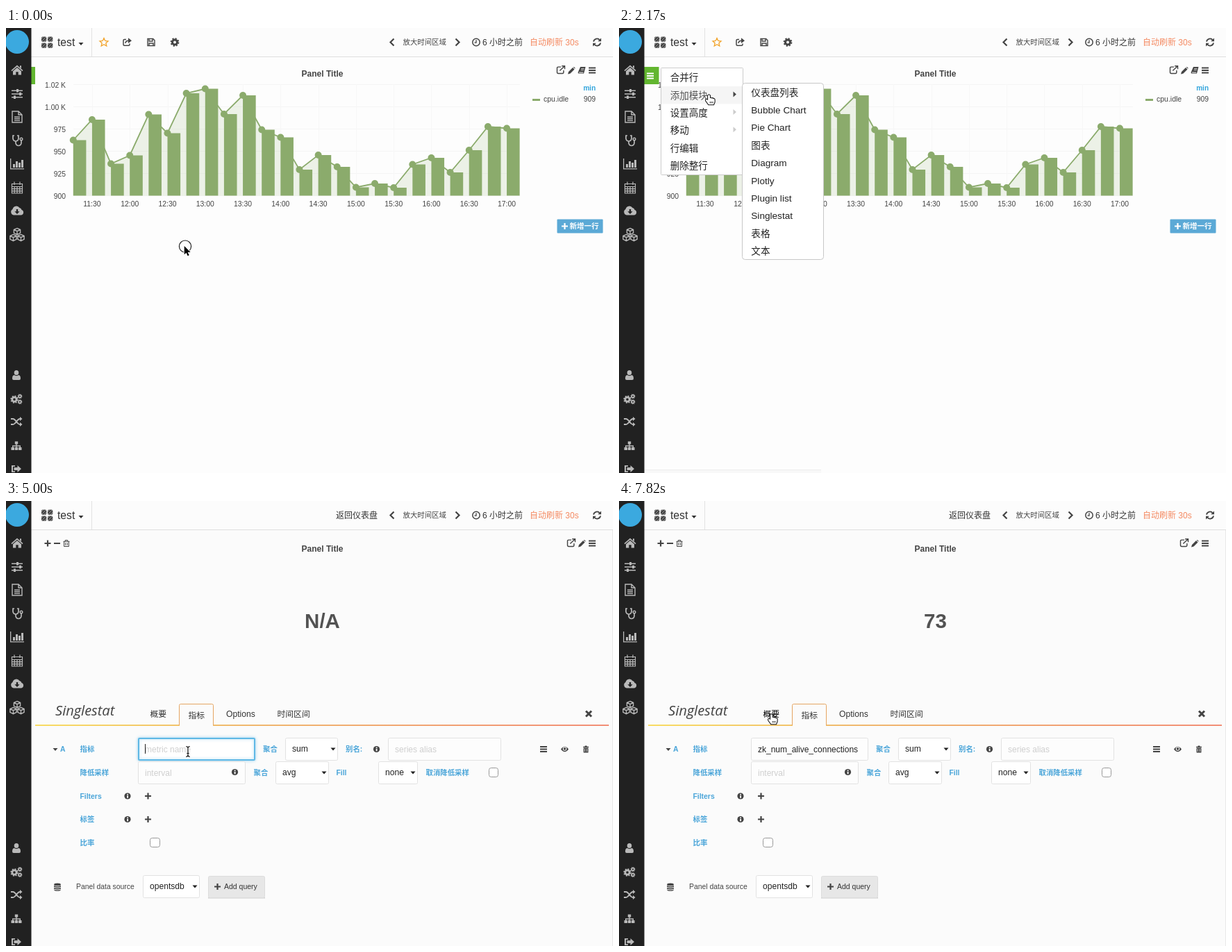
These frames come from a looping animation (874 px wide and 641 px high, 7990 ms). An HTML page with a canvas:

```html
<!DOCTYPE html>
<html lang="zh-CN">
<head>
<meta charset="utf-8">
<title>Dashboard</title>
<style>
html, body { margin: 0; width: 100%; height: 100%; overflow: hidden; background: #fdfdfd; }
canvas { display: block; }
</style>
</head>
<body>
<canvas id="stage" width="874" height="641"></canvas>
<script>
const g = document.getElementById('stage').getContext('2d');
const LOOP = 7990;
const SANS = '"Liberation Sans", "Noto Sans CJK SC", "Noto Sans CJK", sans-serif';
const DARK = '#444', BLUE = '#4aa5d9', GREEN = '#8bab6c', ORANGE = '#ee8243', SIDE = '#b9b9b9';

// y is the middle of the capitals; baselines sit on whole pixels
function text(s, x, y, size, color = DARK, weight = '', align = 'left', font = SANS) {
  g.font = `${weight} ${size}px ${font}`;
  g.textAlign = align;
  g.fillStyle = color;
  g.fillText(s, x, Math.round(y + size * 0.36));
}

function rect(x, y, w, h, color) {
  g.fillStyle = color;
  g.fillRect(x, y, w, h);
}

function box(x, y, w, h, fill, line, r = 2, width = 1) {
  const inset = width / 2;
  g.beginPath();
  g.roundRect(x + inset, y + inset, w - width, h - width, r);
  g.fillStyle = fill;
  g.fill();
  if (line) {
    g.strokeStyle = line;
    g.lineWidth = width;
    g.stroke();
  }
}

function disc(x, y, r, color) {
  g.beginPath();
  g.arc(x, y, r, 0, 7);
  g.fillStyle = color;
  g.fill();
}

function ring(x, y, r, color, width) {
  g.beginPath();
  g.arc(x, y, r, 0, 7);
  g.strokeStyle = color;
  g.lineWidth = width;
  g.stroke();
}

function shape(d, x, y, { fill, line, width = 1.4, scale = 1 }) {
  const p = new Path2D(d);
  g.save();
  g.translate(x, y);
  g.scale(scale, scale);
  if (line) {
    g.strokeStyle = line;
    g.lineWidth = width;
    g.stroke(p);
  }
  if (fill) {
    g.fillStyle = fill;
    g.fill(p, 'evenodd');
  }
  g.restore();
}

const solid = (d, x, y, color = DARK, scale = 1) => shape(d, x, y, { fill: color, scale });
const wire = (d, x, y, color = DARK, width = 1.4, scale = 1) => shape(d, x, y, { line: color, width, scale });

function gear(x, y, r, color) {
  ring(x, y, r * 0.58, color, r * 0.5);
  g.setLineDash([r * 0.353, r * 0.353]);
  ring(x, y, r * 0.9, color, r * 0.32);
  g.setLineDash([]);
}

const plus = (x, y, color = DARK) => solid('M-4.5-1.1H-1.1V-4.5H1.1V-1.1H4.5V1.1H1.1V4.5H-1.1V1.1H-4.5Z', x, y, color);
const caret = (x, y, color = '#222') => solid('M-3.5-2H3.5L0 2Z', x, y, color);
const bars = (x, y, color = DARK) => solid('M-5-4.5H5V-2.5H-5ZM-5-1H5V1H-5ZM-5 2.5H5V4.5H-5Z', x, y, color);
const pencil = (x, y) => solid('M-5 5L-4 1.5L2-4.5L4.5-2L-1.5 4ZM2.7-5.2Q3.5-6 4.5-5L5-4.5Q6-3.5 5.2-2.7Z', x, y);
const external = (x, y) => wire('M0-4H-3.5Q-5-4-5-2.5V3Q-5 4.5-3.5 4.5H2Q3.5 4.5 3.5 3V0.5M-1.5 1L4.7-5M1-5.2H5V-1.2', x, y, DARK, 1.3, 1.1);
const trash = (x, y) => wire('M-5-3H5M-2-3V-5H2V-3M-3.8-3V5H3.8V-3M-1.4-1V3.2M1.4-1V3.2', x, y, DARK, 1.1, 0.9);
const chevron = (x, y, dir) => wire(`M${2.5 * dir}-5L${-2.5 * dir} 0L${2.5 * dir} 5`, x, y, DARK, 2.2);

function info(x, y) {
  disc(x, y, 4.6, DARK);
  rect(x - 0.8, y - 3, 1.8, 1.5, '#fff');
  rect(x - 0.8, y - 0.7, 1.8, 3.5, '#fff');
}

function sidebar() {
  rect(0, 0, 36.5, 641, '#212121');
  disc(16, 20, 17, '#3ba9df');
  solid('M-8.5 0L0-7.5L8.5 0L7.5 1.2L0-5.3L-7.5 1.2ZM-6 1.2L0-4L6 1.2V6.5H1.7V2.2H-1.7V6.5H-6ZM4-6.8H6V-2.8L4-4.6Z', 16, 61, SIDE);
  solid('M-8-5.6H-1V-7H2V-5.6H8V-4H2V-2.4H-1V-4H-8ZM-8-.8H3V-2.2H6V-.8H8V.8H6V2.2H3V.8H-8ZM-8 4H-5V2.5H-2V4H8V5.6H-2V7H-5V5.6H-8Z', 16, 95, SIDE);
  wire('M-7-8H2L7-3V8H-7ZM2-8V-3H7M-4 .2H4M-4 2.8H4M-4 5.4H4', 16, 128, SIDE);
  wire('M-4-7H-6V-3A4 4 0 0 0 2-3V-7H0M-2 1V3.5A4 4 0 0 0 6 3.5V0', 16, 162, SIDE, 1.7);
  ring(22, 160, 1.8, SIDE, 1.4);
  solid('M-10-8H-8.7V6.2H10V7.6H-10ZM-6 0H-3V5H-6ZM-2-4H1V5H-2ZM2-2H5V5H2ZM6-6H9V5H6Z', 16, 196, SIDE);
  wire('M-7.5-5.5H7.5V8H-7.5ZM-7.5-1.5H7.5M-7.5 1.7H7.5M-7.5 4.9H7.5M-3.8-1.5V8M0-1.5V8M3.8-1.5V8M-4-8.5V-4M4-8.5V-4', 16, 230, SIDE, 1.2);
  solid('M-5 6.5A4.6 4.6 0 0 1-6.5-2A5.5 5.5 0 0 1 3.5-4A4 4 0 0 1 6.5-1A3.9 3.9 0 0 1 6 6.5ZM-1.2-2V1.2H-3.6L0 5L3.6 1.2H1.2V-2Z', 16, 263, SIDE);
  for (const [x, y] of [[16, 293], [10.5, 302], [21.5, 302]])
    wire('M0-4.6L4.6-2.5V2.3L0 4.6L-4.6 2.3V-2.5ZM-4.6-2.5L0-.3L4.6-2.5M0-.3V4.6', x, y, SIDE, 1.4);
  solid('M-3.3-3.5A3.3 3.6 0 1 0 3.3-3.5A3.3 3.6 0 1 0-3.3-3.5ZM-6 5Q-6 0-3 0Q0 2 3 0Q6 0 6 5Q6 7 4 7H-4Q-6 7-6 5Z', 15, 500, SIDE);
  gear(12, 535, 5.4, SIDE);
  gear(20, 530.5, 3.2, SIDE);
  gear(20, 538.5, 3.2, SIDE);
  wire('M-8-4H-5Q-3-4 0 0T5 4H6M-8 4H-5Q-3 4 0 0T5-4H6', 15, 567, SIDE, 1.9);
  solid('M5-7L8.5-4L5-1ZM5 1L8.5 4L5 7Z', 15, 567, SIDE);
  solid('M-2.2-6.5H2.2V-2.5H.7V-.7H6V2H7.5V6H3V2H4.6V.7H.7V2H2.2V6H-2.2V2H-.7V.7H-4.6V2H-3V6H-7.5V2H-6V-.7H-.7V-2.5H-2.2Z', 15, 602, SIDE);
  solid('M-7-5H-2V-3.2H-5V3.2H-2V5H-7ZM-3.5-2H1.5V-5L7 0L1.5 5V2H-3.5Z', 15, 635, SIDE);
}

function header(editing) {
  rect(36, 0, 838, 41, '#fcfcfc');
  rect(36, 41, 838, 1, '#dedede');
  rect(123, 0, 1, 41, '#e2e2e2');
  for (let i = 0; i < 4; i++) {
    const x = 50.5 + (i % 2) * 9, y = 12 + (i >> 1) * 9;
    box(x, y, 8.3, 8.3, '#3c3c3c', null, 2);
    wire('M0 4L4 0M.5 7.5L7.5.5M4 8L8 4', x, y, '#ccc', 0.8);
  }
  text('test', 74, 20.7, 15.7, '#333');
  caret(108, 23, '#333');
  if (editing) {
    text('返回仪表盘', 475, 20.7, 12, '#333');
  } else {
    wire('M0-6L1.8-2L6-1.6L2.8 1.2L3.8 5.5L0 3.2L-3.8 5.5L-2.8 1.2L-6-1.6L-1.8-2Z', 141, 20.5, '#f2a42c', 1.3);
    wire('M-1-4H-3.5Q-5-4-5-2.5V3.3Q-5 4.8-3.5 4.8H2.5Q4 4.8 4 3.3V2M-2 1.5Q-2-2.2 3-2.2', 174, 20.5, DARK, 1.5);
    solid('M2-6.2L7-2.3L2 1.6Z', 174, 20.5);
    wire('M-5-5H2.7L5-2.7V5H-5ZM-3-5V-1.5H2V-5M-3 5V1.5H3V5', 209, 20.5, DARK, 1.4);
    gear(243, 20.5, 6, DARK);
  }
  chevron(556, 20.5, 1);
  text('放大时间区域', 571.5, 20.7, 10.4);
  chevron(650, 20.5, -1);
  ring(677, 20.5, 5.2, DARK, 1.5);
  wire('M0-3.2V.6H-2.5', 677, 20.5, DARK, 1.3);
  text('6 小时之前', 686, 20.7, 12, '#333');
  text('自动刷新 30s', 754, 20.7, 12, '#f48a62');
  wire('M-5-.8A5 5 0 0 1 4-3M5 .8A5 5 0 0 1-4 3', 851, 20.5, DARK, 1.8);
  solid('M6-6V-1.2H1.2ZM-6 6V1.2H-1.2Z', 851, 20.5);
}

const TOPS = [161.5, 132, 195.5, 183.5, 124.5, 151.5, 94, 87.5, 124, 97, 146.5, 157.5,
  204, 183, 200, 229.5, 224, 230, 196.5, 187, 208, 176, 142, 144.5];

function chart() {
  const base = 241.5, px = i => 96.8 + i * 27.14;
  ['1.02 K', '1.00 K', '975', '950', '925', '900'].forEach((s, i) => {
    const y = 81.5 + i * 32.05;
    rect(97, Math.round(y) - 1, 643, 1, '#f5f5f5');
    text(s, 86, y + 0.3, 10.4, DARK, '', 'right');
  });
  for (let i = 0; i < 12; i++) {
    const mins = 690 + i * 30, x = px(1 + 2 * i);
    rect(Math.round(x), 81, 1, 160, '#f7f7f7');
    text(`${Math.floor(mins / 60)}:${mins % 60 ? '30' : '00'}`, x, 253.3, 10.4, DARK, '', 'center');
  }
  g.beginPath();
  TOPS.forEach((y, i) => g.lineTo(px(i), y));
  g.strokeStyle = GREEN;
  g.lineWidth = 1.8;
  g.stroke();
  g.lineTo(px(23), base);
  g.lineTo(px(0), base);
  g.fillStyle = 'rgba(139,171,108,.15)';
  g.fill();
  TOPS.forEach((y, i) => {
    rect(px(i), y, 18.6, base - y, GREEN);
    disc(px(i), y, 5, GREEN);
  });
}

function dashboard(wideTab) {
  text('Panel Title', 455.5, 65.3, 12, DARK, 'bold', 'center');
  external(799, 60.5);
  pencil(814, 61.5);
  solid('M-2-5H5.5L3 4.5H-4.5Q-6 4.5-5 2ZM-4 2.4H2.3L2 3.4H-4ZM-.8-3H3.4V-2.2H-1ZM-1.2-1H2.9V-.2H-1.4Z', 829, 61);
  bars(844, 61);
  text('min', 849, 86, 10, '#33a5dc', 'bold', 'right');
  rect(758, 102, 11, 3, GREEN);
  text('cpu.idle', 774, 102.3, 10.5);
  text('909', 849, 102.3, 10.4, DARK, '', 'right');
  chart();
  box(793, 275, 67, 21, '#5ba9d6', null, 1);
  plus(804.5, 285.5, '#fff');
  text('新增一行', 811.5, 285.7, 10.5, '#fff', 'bold');
  rect(36, 56, wideTab ? 21.5 : 6, 25, '#62b62f');
  if (wideTab) bars(45, 69, '#fff');
}

const MENU = ['合并行', '添加模块', '设置高度', '移动', '行编辑', '删除整行'];
const PANELS = ['仪表盘列表', 'Bubble Chart', 'Pie Chart', '图表', 'Diagram', 'Plotly', 'Plugin list', 'Singlestat', '表格', '文本'];
const STEP = 25.4;

function menu(hover) {
  box(60, 57, 119, 155, '#fff', '#ccc', 1);
  MENU.forEach((s, i) => {
    const y = 71.3 + i * STEP, on = i === hover;
    if (on) rect(61, y - 12.7, 117, STEP, '#f5f5f5');
    text(s, 73.7, y, 13.5, on ? '#555' : '#222');
    if (i > 0 && i < 4) solid('M-2-4L2.4 0L-2 4Z', 166.5, y - 1.2, on ? DARK : '#ccc');
  });
}

function submenu(hover) {
  box(177, 79, 118, 255, '#fff', '#c8c8c8', 4);
  PANELS.forEach((s, i) => {
    const y = 92.8 + i * STEP, on = i === hover;
    if (on) rect(178, y - 12.7, 116, STEP, '#f5f5f5');
    text(s, 190.3, y, 13.6, on ? '#666' : '#222');
  });
}

const label = (s, x, y) => text(s, x, y, 10.4, BLUE, 'bold');

function field(x, y, w, hint, value, focus) {
  g.save();
  if (focus) {
    g.shadowColor = 'rgba(82,180,230,.5)';
    g.shadowBlur = 4;
    box(x, y, w, 33, '#fff', '#5fb8e5', 1, 2);
  } else {
    box(x, y, w, 33, '#fdfdfd', '#e2e2e2');
  }
  g.restore();
  text(value || hint, x + 10, y + 16.3, 12, value ? '#222' : '#cfcfcf');
}

function select(x, y, w, value) {
  box(x, y, w, 33, '#fff', '#e2e2e2');
  text(value, x + 10, y + 15.5, 12.1, '#222');
  caret(x + w - 7, y + 16.5);
}

function editor(t) {
  rect(36, 42, 838, 599, '#fbfbfb');
  rect(873, 42, 1, 599, '#e8e8e8');
  if (t >= 3800) {
    plus(60, 61);
    rect(69, 60, 9, 2, DARK);
    trash(87, 61);
  }
  text('Panel Title', 455.5, 69, 12, DARK, 'bold', 'center');
  external(814, 60.5);
  pencil(829, 61.5);
  bars(844, 61);
  text(t >= 7400 ? '73' : 'N/A', 455.5, 172, 29.5, '#525252', 'bold', 'center');

  text('Singlestat', 71, 302, 20.2, DARK, 'italic', 'left', '"Open Sans", sans-serif');
  const grad = g.createLinearGradient(42, 0, 868, 0);
  grad.addColorStop(0, '#f7d231');
  grad.addColorStop(0.35, '#eca43f');
  grad.addColorStop(1, '#ef6a4b');
  rect(42, 322.3, 826, 1.5, grad);
  rect(250, 292, 48, 33, '#fbfbfb');
  wire('M.5 31V2.5Q.5.5 2.5.5H47.5Q49.5.5 49.5 2.5V31', 249, 292, '#e5a562', 1);
  text('概要', 207.5, 307, 11.8, t >= 7760 ? '#000' : '#333');
  text('指标', 262.5, 308.3, 11.8, '#333');
  text('Options', 317, 307, 12.1, '#333');
  text('时间区间', 390.5, 307, 11.8, '#333');
  wire('M-4-4L4 4M4-4L-4 4', 839, 306.5, DARK, 3);

  const value = t >= 5770 ? 'zk_num_alive_connections' : '';
  const focus = t >= 4880 && t < 7090;
  caret(71, 358, DARK);
  label('A', 78, 357.3);
  label('指标', 106.5, 357.3);
  field(190, 341, 169, 'metric name', value, focus);
  if (focus && (t < 5360 || value)) rect(value ? 342 : 200, 350, 1, 14, '#222');
  label('聚合', 370, 357.3);
  select(402, 341, 76, 'sum');
  label('别名:', 489, 357.3);
  info(533.5, 357.5);
  field(550, 341, 163, 'series alias');
  bars(774, 357.5);
  solid('M-5.5 0Q0-7.5 5.5 0Q0 7.5-5.5 0ZM-2.8-.5A2.8 2.8 0 1 0 2.8-.5A2.8 2.8 0 1 0-2.8-.5Z', 804.5, 357.5);
  disc(804.5, 357, 1.8, DARK);
  solid('M-4-3.8H-1.5V-5H1.5V-3.8H4V-2.6H-4ZM-3.4-2H3.4V5H-3.4ZM-1.8-.5V3.5H-1V-.5ZM1-.5V3.5H1.8V-.5Z', 835, 357.5);

  label('降低采样', 106.5, 391);
  field(190, 375, 155, 'interval');
  info(329.5, 390.5);
  label('聚合', 356.5, 391);
  select(388, 375, 77, 'avg');
  label('Fill', 475.5, 391);
  select(536, 375, 57, 'none');
  label('取消降低采样', 604.5, 391);
  box(695, 384, 14, 14, '#fff', '#999', 3);

  label('Filters', 106.5, 425);
  label('标签', 106.5, 458.7);
  label('比率', 106.5, 492);
  for (const y of [425, 458.5]) {
    info(175, y);
    plus(204.5, y);
  }
  box(207, 485, 15, 14, '#fff', '#999', 3);

  solid('M-5-3.5Q-5-5.5 0-5.5T5-3.5Q5-1.8 0-1.8T-5-3.5ZM-5-1.9Q0 .2 5-1.9V-.3Q0 2-5-.3ZM-5 .8Q0 2.9 5 .8V2.4Q0 4.7-5 2.4ZM-5 3.4Q0 5.5 5 3.4Q5 5.7 0 5.7T-5 3.4Z', 74, 556);
  text('Panel data source', 101, 555.5, 10.4);
  select(197, 539, 82, 'opentsdb');
  rect(291, 571, 82, 1.5, '#d2d2d2');
  box(291, 540, 82, 32, '#e7e7e7', '#dcdcdc');
  plus(304.5, 555.5);
  text('Add query', 314, 555.7, 10.5, '#333');

  if (t >= 5180 && t < 7090) suggestions(t >= 5830);
}

const SUFFIXES = ['', '.anomaly', '.health', '.noise', '.periodMinutes', '.prediction',
  '.prediction.max', '.prediction.min', '.seasonal', '.trend'];

function suggestions(matched) {
  const w = matched ? 305 : 347;
  box(190, 375, w, 254, '#fff', '#c9c9c9', 1);
  rect(190 + w - 8, 376, 7, 252, '#dfdfdf');
  SUFFIXES.forEach((s, i) => {
    const y = 389.3 + i * STEP;
    let x = 203.7;
    if (matched) {
      const head = 'zk_num_alive_connections';
      text(head, x, y, 13.4, ORANGE, 'bold');
      x += g.measureText(head).width;
    }
    text(matched ? s : 'cpu.idle' + s, x, y, 13.6, '#222');
  });
}

// start, end, control point, end point, easing
const smooth = u => u * u * (3 - 2 * u), speedUp = u => u * u, slowDown = u => 1 - (1 - u) ** 2;
const MOVES = [
  [380, 1120, 150, 140, 40, 69, smooth],
  [1180, 1340, 41, 71, 42, 72, smooth],
  [1880, 2170, 60, 98, 130, 96, smooth],
  [2460, 2640, 160, 96, 185, 98, speedUp],
  [2640, 3240, 220, 264, 221, 268, slowDown],
  [3980, 4590, 224, 330, 262, 361, smooth],
  [6130, 6850, 290, 361, 354, 333, u => u],
  [7150, 7820, 270, 300, 220, 307, smooth]
];

function pointer(t) {
  let x = 256.7, y = 314;
  for (const [a, b, cx, cy, ex, ey, ease] of MOVES) {
    if (t <= a) break;
    const s = ease(Math.min(1, (t - a) / (b - a))), r = 1 - s;
    x = r * r * x + 2 * r * s * cx + s * s * ex;
    y = r * r * y + 2 * r * s * cy + s * s * ey;
  }
  return [x, y];
}

const CLICKS = [[0, 60], [1640, 1700], [4880, 5000], [7090, 7150]];
const ARROW = 'M0 0V13L3 10.2L5.2 15L7.4 14L5.2 9.4H9.4Z';
const HAND = 'M-2 1.5Q-.5-.8 1 1.5V5.5Q2.5 4.3 3.5 5.8Q5 4.8 6 6.3Q7.8 5.8 8 7.5V11L6.5 15H-1L-5 9.5Q-5.8 7.2-3.7 7.2L-2 8.8Z';
const BEAM = 'M-2.7-7.3Q0-7.3 0-5.3V5.3Q0 7.3-2.7 7.3M2.7-7.3Q0-7.3 0-5.3M0 5.3Q0 7.3 2.7 7.3M-1.7 2.5H1.7';

function cursor(t) {
  const [x, y] = pointer(t);
  if (CLICKS.some(([a, b]) => t >= a && t < b)) ring(x + 1.3, y + 0.6, 8.6, '#222', 1.2);
  if ((t >= 1150 && t < 3300) || t >= 7760) {
    shape(HAND, x, y, { fill: '#fff', line: '#111', width: 2.2, scale: 0.95 });
    wire('M1.3 10.5V13M3.3 10.5V13M5.3 10.5V13', x, y, '#111', 0.9, 0.95);
  } else if (t >= 3980 && x > 190 && x < 359 && y > 341 && y < 374) {
    wire(BEAM, x, y, '#fff', 3);
    wire(BEAM, x, y, '#111', 1.2);
  } else {
    shape(ARROW, x, y, { fill: '#000', line: '#fff', width: 2, scale: 0.95 });
  }
}

function draw(t) {
  const editing = t >= 3640;
  rect(0, 0, 874, 641, '#fdfdfd');
  if (editing) editor(t);
  else dashboard(t >= 1120);
  header(editing);
  sidebar();
  if (t >= 1640 && t < 3570) {
    const [x, y] = pointer(t - 60);
    const deep = t >= 2110;
    const row = x > 60 && x < 178 ? Math.floor((y - 58.6) / STEP) : -1;
    menu(deep ? 1 : row);
    if (deep) {
      submenu(x >= 178 ? Math.floor((y - 80.1) / STEP) : -1);
      rect(37, 637, 254, 4, '#f8f8f8');
      rect(37, 636, 254, 1, '#ededed');
    }
  }
  cursor(t);
}

const start = performance.now();
function tick() {
  draw((performance.now() - start) % LOOP);
  requestAnimationFrame(tick);
}
tick();
</script>
</body>
</html>
```
